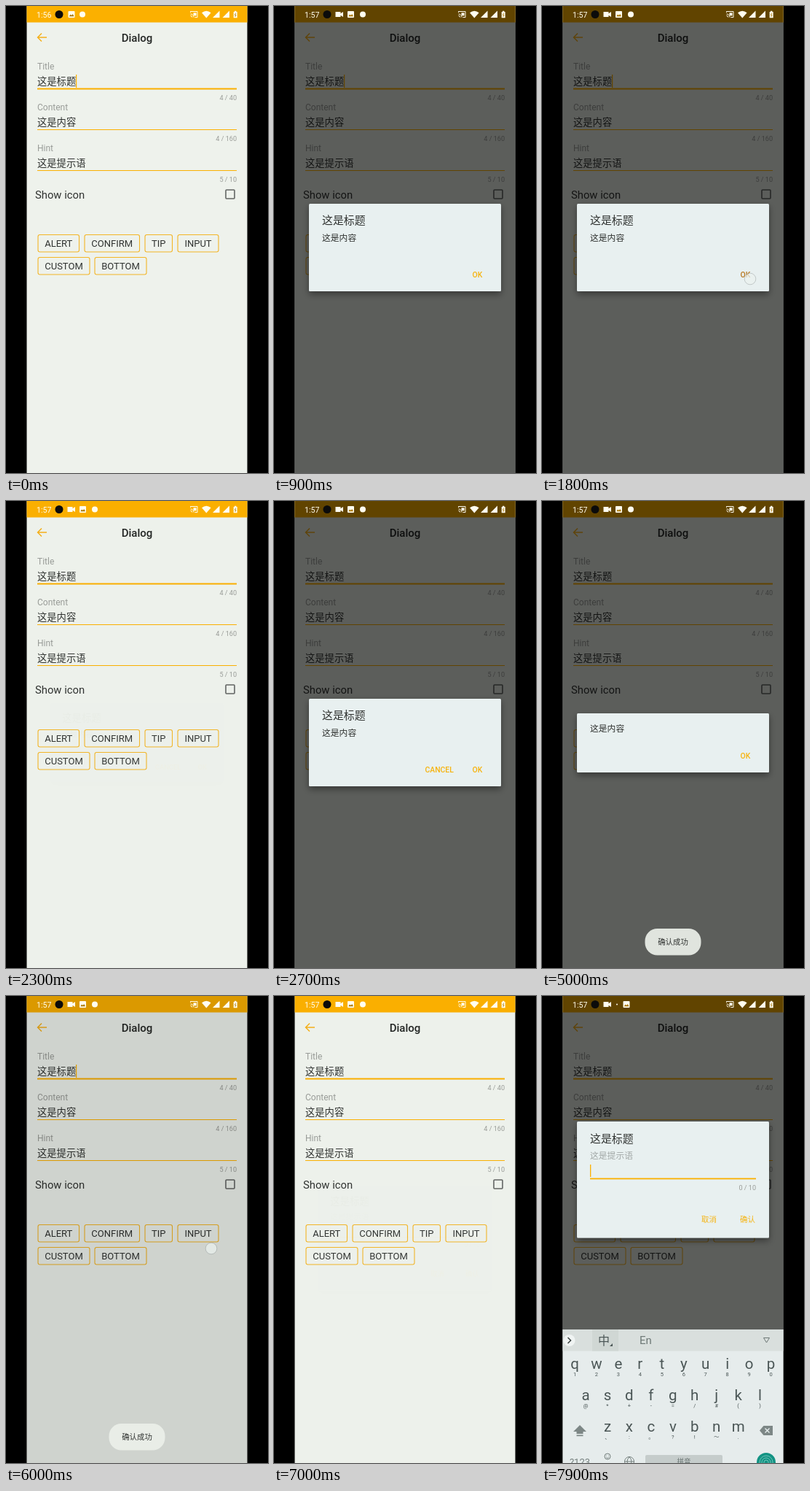
An HTML page that plays this animation: 360x640 px, repeating every 8 s.

```html
<!DOCTYPE html>
<html lang="zh-CN">
<head>
<meta charset="utf-8">
<title>Dialog</title>
<style>
html, body { margin: 0; width: 100%; height: 100%; overflow: hidden; background: #000; }
svg { display: block; width: 360px; height: 640px; }
text { font-family: Roboto, "Noto Sans CJK SC", "Noto Sans CJK", sans-serif; white-space: pre; }
</style>
</head>
<body>
<svg id="stage" viewBox="0 0 360 640"></svg>
<script>
const LOOP = 8000, DIM = 0.61;
const AMBER = '#fbb000', INK = '#303331', GREY = '#9a9d99', PAPER = '#eef2ec', SHEET = '#e8f0f0', KEY = '#4b5656';
const stage = document.getElementById('stage');

function el(parent, tag, attrs) {
  const node = document.createElementNS('http://www.w3.org/2000/svg', tag);
  for (const k in attrs) node.setAttribute(k, attrs[k]);
  parent.appendChild(node);
  return node;
}
const group = (p, a) => el(p, 'g', a);
const rect = (p, x, y, width, height, fill, more) => el(p, 'rect', { x, y, width, height, fill, ...more });
const circle = (p, cx, cy, r, fill, more) => el(p, 'circle', { cx, cy, r, fill, ...more });
const shape = (p, d, fill) => el(p, 'path', { d, fill });
const line = (p, d, stroke, width = 1) => el(p, 'path', { d, fill: 'none', stroke, 'stroke-width': width });

// y is the middle of the capitals
function label(p, x, y, str, size, fill, more) {
  const node = el(p, 'text', { x, y: y + size * 0.36, 'font-size': size, fill, ...more });
  node.textContent = str;
  return node;
}
const MID = { 'text-anchor': 'middle' }, END = { 'text-anchor': 'end' }, MEDIUM = { 'font-weight': 500 };
const show = (node, on) => node.setAttribute('visibility', on ? 'visible' : 'hidden');
const fade = (node, a) => node.setAttribute('opacity', a);
const ramp = (t, start, length) => Math.min(1, Math.max(0, (t - start) / length));
const easeOut = p => 1 - (1 - p) ** 3;

const defs = el(stage, 'defs');
const clip = el(defs, 'clipPath', { id: 'screen' });
rect(clip, 28.5, 0, 303, 640, '#000');
const shadow = el(defs, 'filter', { id: 'shadow', x: '-15%', y: '-25%', width: '130%', height: '160%' });
el(shadow, 'feDropShadow', { dx: 0, dy: 4, stdDeviation: 5, 'flood-color': '#000', 'flood-opacity': 0.4 });

const screen = group(stage, { 'clip-path': 'url(#screen)' });

// Form page
const page = group(screen);
rect(page, 28, 0, 304, 640, PAPER);
rect(page, 28, 0, 304, 22.5, AMBER);
line(page, 'M56 43H43.5M49 37.5L43.5 43L49 48.5', '#f5b01c', 1.5);
label(page, 180, 44, 'Dialog', 15, '#222523', { ...MID, ...MEDIUM });
[['Title', '这是标题', '4 / 40', 2], ['Content', '这是内容', '4 / 160', 1], ['Hint', '这是提示语', '5 / 10', 1]]
  .forEach(([name, value, count, weight], i) => {
    const y = 56 * i;
    label(page, 43, y + 82.5, name, 12, GREY);
    label(page, 43, y + 102.8, value, 13.3, INK);
    rect(page, 43, y + 113.5 - weight / 2, 274, weight, AMBER);
    label(page, 317, y + 126, count, 9.1, GREY, END);
  });
const pageCaret = rect(page, 96, 94, 1.2, 18, AMBER);
label(page, 40, 258.5, 'Show icon', 14.8, INK);
rect(page, 302, 252, 12, 12, 'none', { stroke: '#636664', 'stroke-width': 1.6, rx: 1 });
[['ALERT', 44, 313, 56.5], ['CONFIRM', 108, 313, 75.5], ['TIP', 191, 313, 37.5], ['INPUT', 236, 313, 56],
 ['CUSTOM', 44, 344, 71], ['BOTTOM', 122, 344, 71]].forEach(([name, x, y, w]) => {
  rect(page, x, y + 0.5, w, 23.5, 'none', { rx: 2.5, stroke: '#f3b526', 'stroke-width': 1.1 });
  label(page, x + w / 2, y + 12.5, name, 13, INK, MID);
});

const dim = rect(screen, 28, 0, 304, 640, '#000');

// Dialogs
function sheet(y, h) {
  const g = group(screen);
  rect(g, 48, y, 264, h, SHEET, { rx: 1.5, filter: 'url(#shadow)' });
  return g;
}
const action = (g, x, y, str) => label(g, x, y, str, 10.4, '#f6b30f', MEDIUM);

function message(y, h, title, cancel) {
  const g = sheet(y, h);
  if (title) label(g, 66, y + 23, '这是标题', 14.9, INK);
  label(g, 66, y + (title ? 47 : 21), '这是内容', 11.8, INK);
  if (cancel) action(g, 207.5, y + h - 22.5, 'CANCEL');
  return { g, ok: action(g, 272.5, y + h - 22.5, 'OK') };
}
function prompt() {
  const g = sheet(172, 159.5);
  label(g, 66, 195.5, '这是标题', 14.9, INK);
  label(g, 66, 219, '这是提示语', 11.8, '#a3a9a8');
  rect(g, 66, 231, 1.3, 17, AMBER);
  rect(g, 66, 249.5, 228, 1.8, AMBER);
  label(g, 294, 262.5, '0 / 10', 9.1, GREY, END);
  action(g, 219, 306, '取消');
  action(g, 272, 306, '确认');
  return { g };
}
const dialogs = [
  { ...message(271, 120, true, false), open: 400, close: 1890 },
  { ...message(271, 120, true, true), open: 2300, close: 3800 },
  { ...message(291, 81, false, false), open: 4600, close: 5828 },
  { ...prompt(), open: 7000, close: LOOP + 1000, lifts: true }
];

// Keyboard
const keyboard = group(screen);
rect(keyboard, 28, 457, 304, 183, '#e6ecec');
rect(keyboard, 28, 457, 304, 29.5, '#d9dfdd');
rect(keyboard, 69, 457, 36, 29.5, '#d0d7d4');
circle(keyboard, 37.5, 472, 8, '#f0f4f3');
line(keyboard, 'M35.5 468L39.5 472L35.5 476', '#39413f', 1.5);
label(keyboard, 85, 472, '中', 16, KEY, MID);
shape(keyboard, 'M97 476V480H93Z', KEY);
label(keyboard, 142.5, 472, 'En', 15, '#6d7876', MID);
line(keyboard, 'M304.5 468.5H312.5L308.5 475Z', '#6d7876');
[['qwertyuiop', '1234567890', 45, 505], ['asdfghjkl', '@*+-=/#()', 60, 548], ['zxcvbnm', '、:。?!～.', 90, 591]]
  .forEach(([keys, marks, x0, y]) => [...keys].forEach((key, i) => {
    const x = x0 + i * 29.95;
    label(keyboard, x, y - 1, key, 20.5, KEY, MID);
    label(keyboard, x, y + 13.5, marks[i], 7.5, KEY, MID);
  }));
shape(keyboard, 'M52 588L61 597H56.5V600H47.5V597H43Z', '#7d8786');
rect(keyboard, 47.5, 601.5, 9, 1.7, '#7d8786');
shape(keyboard, 'M299 595.5L304.5 589H317V602H304.5Z', '#7d8786');
line(keyboard, 'M306.5 592.5L312.5 598.5M312.5 592.5L306.5 598.5', SHEET, 1.3);
label(keyboard, 52, 638, '?123', 13, '#737e7c', MID);
circle(keyboard, 90, 631, 4, 'none', { stroke: '#737e7c' });
line(keyboard, 'M88 632Q90 635 92 632M88.5 629.5V630.5M91.5 629.5V630.5', '#737e7c', 0.8);
circle(keyboard, 120, 638, 6.5, 'none', { stroke: '#737e7c' });
line(keyboard, 'M113.5 638H126.5M120 631.5Q114 638 120 644.5Q126 638 120 631.5', '#737e7c');
rect(keyboard, 142, 629, 106, 20, '#c5cccb', { rx: 2 });
label(keyboard, 195, 638, '拼音', 9.5, '#6a7573', MID);
circle(keyboard, 308, 639, 13, '#129383');
[3, 6, 9].forEach(r => line(keyboard, `M${308 - r} 641V639A${r} ${r} 0 0 1 ${308 + r} 639V641`, '#7cc9bf', 0.9));

// Toast
const toast = group(screen);
rect(toast, 141.5, 586, 77, 36.5, 'rgba(236,240,234,.92)', { rx: 17 });
label(toast, 180, 604.3, '确认成功', 10.4, INK, MID);

// Status bar
const status = group(screen);
const WHITE = '#fffdf0';
const clock = label(status, 42, 11.7, '1:56', 10.6, WHITE);
circle(status, 73, 11.5, 5.5, '#0b0b0b');
const camera = group(status);
shape(camera, 'M84.5 8H91.5V10.2L95 8V15L91.5 12.8V15H84.5Z', WHITE);
const dot = circle(status, 103, 11.5, 1, WHITE);
const picture = group(status);
rect(picture, -4.5, 7, 9, 9, WHITE, { rx: 1 });
shape(picture, 'M-3.3 14.3L-1.2 11.5L0.2 13L1.7 11L3.5 14.3Z', '#a87400');
const badge = circle(status, 0, 11.5, 4, WHITE);
line(status, 'M253.5 9V7.5H263V15.5H259.5M253.5 11A4.5 4.5 0 0 1 258 15.5M253.5 13.3A2.2 2.2 0 0 1 255.7 15.5', WHITE);
rect(status, 257.5, 9.3, 4, 4, WHITE);
shape(status, 'M269 9.2Q275.3 4.2 281.6 9.2L275.3 16.5Z', WHITE);
[284, 297.5].forEach(x => shape(status, `M${x} 16H${x + 9.5}V6.5Z`, WHITE));
shape(status, 'M312.7 8H314V6.8H316.4V8H317.7V16.3H312.7Z', WHITE);
line(status, 'M315.8 9.5L314.4 12.3H316L314.7 15', '#a87400', 0.8);

// Touches: down, up, x, y, halo radius
const touches = [
  [100, 320, 72, 328, 0], [1700, 1900, 286, 374, 0], [2100, 2300, 146, 328, 0], [3600, 3930, 286, 367, 15],
  [4250, 4450, 210, 328, 0], [5750, 6030, 282, 346, 0], [6800, 7000, 265, 328, 0]
];
const finger = group(screen);
const halo = circle(finger, 0, 0, 0, 'rgba(0,0,0,.1)');
circle(finger, 0, 0, 7.8, 'rgba(236,241,239,.72)', { stroke: 'rgba(90,96,94,.35)', 'stroke-width': 0.8 });

const caretOn = [[0, 2250], [4000, 4250], [5900, 6450]];
const within = t => ([a, b]) => t >= a && t < b;

function draw(t) {
  const touch = touches.find(within(t));
  show(finger, touch);
  if (touch) {
    finger.setAttribute('transform', `translate(${touch[2]} ${touch[3]})`);
    halo.setAttribute('r', touch[4]);
  }

  let shade = 0;
  for (const d of dialogs) {
    const p = easeOut(ramp(t, d.open, 150));
    const alpha = p * (1 - ramp(t, d.close, 150));
    const scale = 0.9 + 0.1 * p;
    const drop = d.lifts ? 80 * (1 - easeOut(ramp(t, 7450, 300))) : 0;
    shade = Math.max(shade, ramp(t, d.open, 220) * (1 - ramp(t, d.close, 220)));
    show(d.g, alpha > 0);
    fade(d.g, alpha);
    d.g.setAttribute('transform', `translate(180 ${331 + drop * scale}) scale(${scale}) translate(-180 -331)`);
    if (d.ok) d.ok.setAttribute('fill', touch && t >= d.open ? '#b9781f' : '#f6b30f');
  }
  fade(dim, shade * DIM);

  show(pageCaret, caretOn.some(within(t)));
  show(keyboard, t >= 7500);
  keyboard.setAttribute('transform', `translate(0 ${183 * (1 - easeOut(ramp(t, 7500, 400)))})`);
  fade(toast, ramp(t, 4000, 250) * (1 - ramp(t, 6250, 250)));

  const later = t >= 500, typing = t >= 7500;
  clock.textContent = later ? '1:57' : '1:56';
  show(camera, later);
  show(dot, typing);
  show(badge, !typing);
  picture.setAttribute('transform', `translate(${typing ? 116 : later ? 105.5 : 90} 0)`);
  badge.setAttribute('cx', later ? 122 : 105);
}

const start = performance.now();
function tick(now) {
  draw(Math.max(0, now - start) % LOOP);
  requestAnimationFrame(tick);
}
draw(0);
requestAnimationFrame(tick);
</script>
</body>
</html>
```
